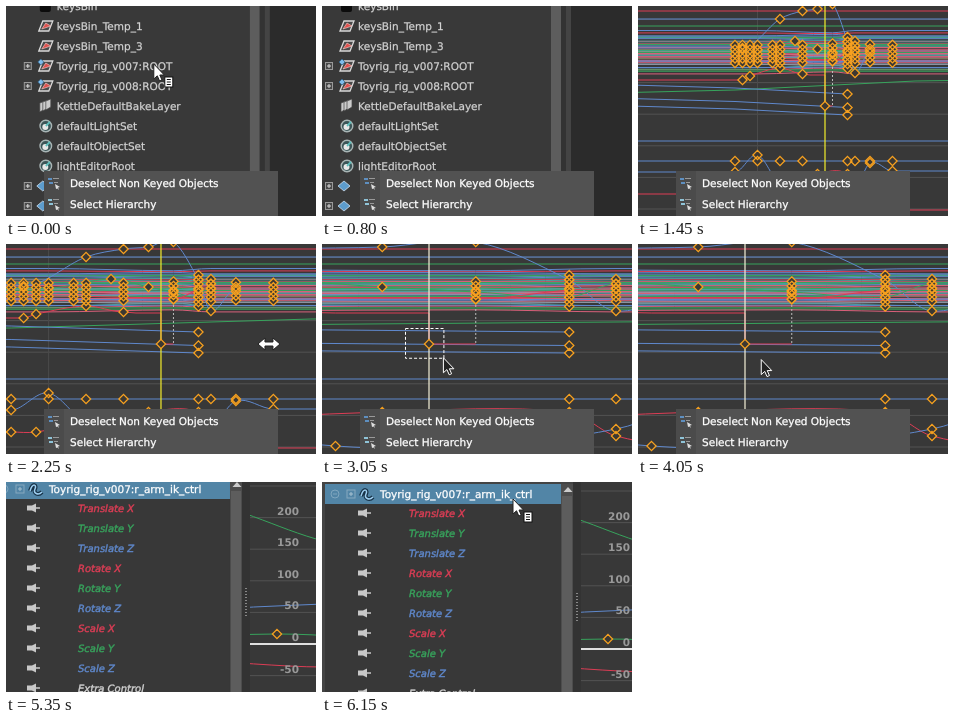
These frames come from a looping animation (310x210 px, 6.6 s). An HTML page:

```html
<!DOCTYPE html>
<html lang="en">
<head>
<meta charset="utf-8">
<title>Select hierarchy, deselect non keyed objects</title>
<style>
html, body { margin: 0; width: 100%; height: 100%; overflow: hidden; background: #2b2b2b; }
svg { display: block; width: 310px; height: 210px; }
text { font-family: "DejaVu Sans", "Noto Sans", sans-serif; font-size: 10.5px; fill: #d2d2d2; stroke: #d2d2d2; stroke-width: .25; text-rendering: geometricPrecision; }
.sel { fill: #fff; stroke: #fff; stroke-width: .3; }
.attr { font-size: 10px; font-style: italic; stroke-width: .4; }
.axis { font-weight: bold; fill: #999; stroke: none; text-anchor: end; }
.curve { fill: none; vector-effect: non-scaling-stroke; }
</style>
</head>
<body>
<svg id="stage" viewBox="0 0 310 210"></svg>
<script>
const LOOP = 6600, RED = '#dc3d55', GREEN = '#37a35c', BLUE = '#5f88cc', PICK = '#5285a6';
const stage = document.getElementById('stage');
const $ = id => document.getElementById(id);

const rect = (x, y, w, h, fill, more = '') => `<rect x="${x}" y="${y}" width="${w}" height="${h}" fill="${fill}" ${more}/>`;
const path = (d, more) => `<path d="${d}" ${more}/>`;
const label = (x, y, s, more = '') => `<text x="${x}" y="${y + 4}" ${more}>${s}</text>`;
const at = (x, y, s) => `<g transform="translate(${x} ${y})">${s}</g>`;
const fold = (x, y, open) => at(x, y, rect(-3.5, -3.5, 7, 7, '#4a4a4a', 'stroke="#999"') +
  path('M-2 0H2' + (open ? '' : 'M0 -2V2'), 'stroke="#ddd"'));

// ---- icons, centred on 0,0
const joint = path('M-7 5L-3 -5H7L3 5Z', 'fill="#4a4a4a" stroke="#d8d8d8" stroke-width="1.3"') +
  path('M-4 3L0 -3L5 0Z', 'fill="#e0524f" stroke="#f2d5d2" stroke-width=".6"');
const gem = path('M-5 -7L-2 -4L-5 -1L-8 -4Z', 'fill="#7fbcea" stroke="#2e5f88" stroke-width=".7"');
const mesh = path('M-6 0L0 -5L7 0L0 5Z M-3 -2.5L3.5 2.5M3.5 -2.5L-3 2.5', 'fill="#dfe3e6" stroke="#3d4a55" stroke-width=".9"');
const layers = [0, 3, 6].map(i => path(`M${i - 6} ${-3 - i / 3}l5 -2v8l-5 3Z`, 'fill="#ccc" stroke="#444" stroke-width=".7"')).join('');
const ring = '<circle r="5.8" fill="#3c5557" stroke="#a9b5b5" stroke-width="1.4"/>' +
  '<circle cx="-.5" cy="1" r="3" fill="#e8e8e8"/>' + path('M0 0L4 -4', 'stroke="#5fc0bd" stroke-width="1.8"');
const bead = path('M0 -5L6 0L0 5L-6 0Z', 'fill="#5d9ccc" stroke="#cde" stroke-width=".8"');
const mute = path('M-6 -2.5H-1L3 -4.5V4.5L-1 2.5H-6Z M3 -.8H7V.8H3Z', 'fill="#c8c8c8"');
const wave = (color, width) => path('M-6 2C-3 -7 1 -4 -1 0S2 7 6 3', `fill="none" stroke="${color}" stroke-width="${width}"`);
const bend = wave('#173247', 4) + wave('#9fd0f2', 1.5);

// ---- scene list
function sceneList() {
  const rows = (y, list, fn) => list.map((s, i) => fn(s, y + i * 20)).join('');
  const top = rect(34, -5, 11, 11, '#0c0c0c', 'rx="2"') + label(51, 0, 'keysBin') +
    rows(20, ['keysBin_Temp_1', 'keysBin_Temp_3'], (s, y) => at(40, y, joint) + label(51, y, s));
  const rest = fold(22, 80) + at(40, 80, joint + gem) + label(51, 80, 'Toyrig_rig_v008:ROOT') +
    at(40, 100, layers) + label(51, 100, 'KettleDefaultBakeLayer') +
    rows(120, ['defaultLightSet', 'defaultObjectSet', 'lightEditorRoot'], (s, y) => at(40, y, ring) + label(51, y, s)) +
    rows(180, ['', ''], (s, y) => fold(22, y) + at(37, y, bead));
  const kids = rect(0, 70, 244, 145, PICK) + path('M22 70V210M34 88V210M46 88V210', 'stroke="#3f6985" stroke-dasharray="1 1"') +
    fold(34, 80, true) + at(51, 80, joint + gem) + label(64, 80, 'Toyrig_rig_v007:MESH', 'class="sel"') +
    rows(100, ['upperteeth', 'brows', 'lowerteeth', 'tongue', 'eyes', 'lashes'], (s, y) =>
      `<circle cx="46" cy="${y}" r="2.2" fill="#9db6c6"/>` + at(63, y, mesh + gem) +
      label(75, y, `Toyrig_rig_v007:${s}_c_geo`, 'class="sel"'));
  return `<g id="list">${rect(-30, 0, 900, 210, '#2b2b2b')}${rect(-30, 0, 274, 210, '#393939')}
    ${rect(244, 0, 10, 210, '#5d5d5d')}${rect(254, 0, 10, 210, '#333')}${rect(259, 0, 5, 210, '#444')}
    <g clip-path="url(#listClip)">${top}<g id="rest">${rest}</g><g clip-path="url(#openClip)">${kids}</g>
    ${rect(0, 50, 244, 20, PICK, 'id="rootSel"')}<g id="plus">${fold(22, 60)}</g><g id="minus">${fold(22, 60, true)}</g>
    ${at(40, 60, joint + gem)}${label(51, 60, 'Toyrig_rig_v007:ROOT', 'id="root"')}</g></g>`;
}

// ---- curves: points are [key time, y], level beyond both ends
function smooth(p) {
  const last = p.length - 1;
  const slope = i => i === 0 || i === last ? 0 : (p[i + 1][1] - p[i - 1][1]) / (p[i + 1][0] - p[i - 1][0]);
  let d = `M-40 ${p[0][1]}H${p[0][0]}`;
  for (let i = 1; i <= last; i++) {
    const [a, b] = [p[i - 1], p[i]], h = (b[0] - a[0]) / 3;
    d += `C${a[0] + h} ${a[1] + h * slope(i - 1)} ${b[0] - h} ${b[1] - h * slope(i)} ${b}`;
  }
  return d;
}
const curve = (d, color) => path(d, `class="curve" stroke="${color}"`);

const tracks = [
  { color: BLUE, keys: [[-11, 42], [-6, 13], [-3, 5], [-1, 3], [1, -2], [3, 36], [4, 67], [6, 45]], tail: 'H40' },
  { color: GREEN, keys: [[-9, 44], [-4, 35], [-1, 43], [1, 48], [3, 53], [4, 40]], tail: 'H40' },
  { color: GREEN, keys: [[-6, -98], [-3, -58], [-1, -40]], tail: 'H40' },
  { color: RED, keys: [[-11, 74], [-10, 70], [-6, 62], [-3, 68]], tail: 'L-2 69H0V100H1' },
  { color: RED, keys: [[1, 55], [3, 46], [4, 45]], tail: 'H40', from: 1 },
  { color: RED, keys: [[-12, 188], [-10, 188], [-1, 168], [3, 168], [4, 192], [6, 204]], tail: 'H40' },
  { color: BLUE, keys: [[-12, 166], [-9, 149], [-6, 180], [-2, 202], [1, 203], [4, 185], [6, 157], [9, 165]], tail: 'H40' }
];
const trackPath = k => (k.from ? smooth(k.keys).replace(/^M-40 .*?H/, `M${k.keys[0]}H`) : smooth(k.keys)) + k.tail;
const keyed = tracks.map(k => curve(trackPath(k), k.color)).join('');
const mainKeys = tracks.flatMap(k => k.keys);

let seed = 11;
const rnd = () => (seed = seed * 16807 % 2147483647) / 2147483647;
const sinking = [88, 101.5, 109];

function flatLines() {
  const tint = [RED, GREEN, BLUE, '#d9607a', '#4d9fa0', '#8f9aa8'];
  let s = '';
  for (let i = 0; i < 50; i++) {
    // crowded around zero, thinner further out
    const r = i / 25 - 1, y = 47 + 21 * r * (.6 + .4 * r * r), k = rnd() * 3 - 1.5;
    s += curve(smooth([[-9, y + k], [1, y - k / 2], [4, y + k]]) + 'H40', tint[Math.floor(rnd() * 6)]);
  }
  [5, 13, 20, 135, 155].forEach((y, i) => s += curve(`M-40 ${y}H40`, [RED, BLUE, GREEN, BLUE, BLUE][i]));
  s += curve('M-40 89L-12 84L12 75L40 72', GREEN);
  sinking.forEach(y => s += curve(`M-40 ${y - 12}L-12 ${y - 6}L3 ${y}`, BLUE));
  return s;
}

const moreKeys = sinking.map(y => [3, y]);
for (const u of [-12, -11, -10, -9, -7, -6, -3, 1, 3, 4, 6, 9]) {
  const half = 9 + 8 / (1 + (u - 3) ** 2);
  for (let y = 48 - half; y <= 48 + half; y += 4.5) moreKeys.push([u, y]);
  if (u % 3 === 0 || u === 4) moreKeys.push([u, 155]);
}
const diamond = (x, y) => `M${x} ${y - 4.6}l4.6 4.6l-4.6 4.6l-4.6 -4.6Z`;

// ---- curve editor, with its channel panel to the left
function editor() {
  const axes = [['X', RED], ['Y', GREEN], ['Z', BLUE]];
  let grid = '', axis = '', rows = '';
  for (let v = -300; v <= 300; v += 50) {
    const y = 45 - v * .632;
    grid += path(`M-107 ${y}H700`, 'stroke="#525252"');
    if (v > -100 && v < 250) axis += label(-58, y - 7, v, 'class="axis"');
  }
  ['Translate', 'Rotate', 'Scale'].forEach((n, i) => axes.forEach(([a, c], j) => {
    const y = 31 + (i * 3 + j) * 20;
    rows += at(42, y, mute) + label(87, y, `${n} ${a}`, `class="attr" style="fill:${c};stroke:${c}"`);
  }));
  rows += at(42, 211, mute) + label(87, 211, 'Extra Control', 'class="attr"');
  const panel = rect(-300, -300, 559, 800, '#444') + rect(3, 2, 236, 400, '#383838') + rect(3, 2, 236, 20, PICK) +
    '<circle cx="13" cy="12" r="4" fill="none" stroke="#7fa6bf"/>' + path('M11 12H15', 'stroke="#7fa6bf"') +
    at(29, 12, rect(-4, -4, 8, 8, 'none', 'stroke="#86a9bf"') + path('M-2 0H2M0 -2V2', 'stroke="#a8c2d2"')) +
    at(45, 12, bend) + label(58, 12, 'Toyrig_rig_v007:r_arm_ik_ctrl', 'class="sel"') + rows +
    rect(239, 2, 12, 400, '#4d4d4d') + rect(240, 14, 10, 390, '#5d5d5d') + path('M241.5 10L246 5L250.5 10Z', 'fill="#ccc"') +
    rect(251, -300, 8, 800, '#333') + path('M255 111V140', 'stroke="#888" stroke-width="2" stroke-dasharray="1 2"');
  return `<g id="ed">${rect(-107, -300, 900, 800, '#383838')}${grid}
    <path id="tick" stroke="#4a4a4a"/>${path('M-107 45H700', 'stroke="#e0e0e0" stroke-width="2"')}
    <g id="zoom"><g id="flat">${flatLines()}</g>${keyed}</g>
    <path id="step" stroke="#bbb" stroke-dasharray="2 2"/><path id="bar" stroke-width="1.2"/>
    <g fill="#3c3832" stroke="#f6a01f" stroke-width="1.3"><path id="keys"/><path id="hot"/></g>
    ${axis}<g id="panel" transform="translate(-366 -122)">${panel}</g></g>`;
}

function menu() {
  const icon = (y, c) => at(48, y, rect(-6, -5, 4, 2, c) + rect(-5, -1, 4, 2, c) + rect(-1, -5, 6, 1, '#999') + rect(0, -1, 4, 1, '#999') +
    path('M1 1L6 4L4 4.500L5 7L3.500 5.500L2 6Z', 'fill="#ddd"'));
  return `<g id="menu">${rect(38, 165, 234, 45, '#525252')}${rect(38, 165, 20, 45, '#4b4b4b')}
    ${rect(58, 166, 214, 22, PICK, 'id="pick1"')}${rect(58, 188, 214, 20, PICK, 'id="pick2"')}${icon(177, '#5e8fc0')}${icon(198, '#8fc4d8')}
    ${label(64, 177, 'Deselect Non Keyed Objects', 'class="sel"')}${label(64, 198, 'Select Hierarchy', 'class="sel"')}</g>`;
}

stage.innerHTML = `<defs><clipPath id="listClip">${rect(0, 0, 244, 210, '#000')}</clipPath>
  <clipPath id="openClip"><rect id="open" y="70" width="244" height="0"/></clipPath></defs>
  ${sceneList()}${editor()}
  <rect id="marquee" x="83.5" y="84.5" fill="none" stroke="#fff" stroke-dasharray="3 2"/>
  <g id="arrow">${path('M0 0V15L3.5 11.8L5.8 17L8.2 16L6 11H10.5Z', 'id="tip"')}
    <g id="sheet">${rect(11, 13, 8, 10, '#fff', 'stroke="#111"')}${path('M13 15.5H17M13 18H17M13 20.5H17', 'stroke="#111"')}</g></g>
  <g id="drag">${path('M-11 0L-4 -6V-2H4V-6L11 0L4 6V2H-4V6Z', 'fill="#fff" stroke="#222"')}</g>
  ${menu()}`;

// ---- motion
const part = (t, a, b) => Math.min(1, Math.max(0, (t - a) / (b - a)));
const ease = p => p < .5 ? Math.pow(2 * p, 2.7) / 2 : 1 - Math.pow(2 - 2 * p, 2.7) / 2;
const glide = (t, a, b) => ease(part(t, a, b));
const slide = t => 1 - Math.pow(1 - part(t, 0, 150), 2);
const mix = (a, b, p) => a + (b - a) * p;
const show = (id, on) => $(id).setAttribute('display', on ? 'inline' : 'none');
const move = (id, x, y) => $(id).setAttribute('transform', `translate(${x} ${y})`);
const set = (id, k, v) => $(id).setAttribute(k, v);
const within = (t, a, b) => t >= a && t < b;

function pointer(t) {
  const go = (a, b, p) => [mix(a[0], b[0], p), mix(a[1], b[1], p)];
  const corner = [83, 84], rest = [123, 115];
  if (t < 300) return [148 - 15 * slide(t), 58];
  if (t < 1500) return go([133, 58], [123, 172], part(t, 300, 400));
  if (t < 2850) return go([263, 100], corner, glide(t, 2450, 2850));
  if (t < 4000) return go(corner, rest, glide(t, 2850, 3100));
  if (t < 5400) return go(rest, [150, 178], glide(t, 4000, 4450));
  return go([258, 128], [191, 17], glide(t, 5800, 6150));
}

function draw(t) {
  const enter = glide(t, 1250, 1450), back = glide(t, 4950, 5450), open = glide(t, 850, 1050);

  show('list', t < 1450);
  move('list', -15 * slide(t) - 400 * enter, 0);
  move('rest', 0, 150 * open);
  set('open', 'height', 145 * open);
  show('rootSel', t >= 850);
  show('plus', open === 0);
  show('minus', open > 0);
  set('root', 'class', t >= 850 ? 'sel' : '');

  // horizontal zoom about the current time
  const scrub = glide(t, 1700, 2400), near = glide(t, 2450, 3000);
  const z = 12.5 * (.6 + .42 * scrub), unit = z * Math.pow(46.75 / z, near);
  const x0 = mix(187 - 33.7 * scrub, 107, near), x = u => x0 + u * unit;
  const all = t < 4700;
  show('ed', t > 1250);
  move('ed', 400 * (1 - enter) + 366 * back, 122 * back);
  set('zoom', 'transform', `translate(${x0} 0) scale(${unit} 1)`);
  show('flat', all);
  show('panel', t >= 4950);
  set('tick', 'd', `M${x(-9)} -300V400`);
  set('step', 'd', `M${x(1)} 57V100`);
  set('bar', 'd', `M${x0} -300V400`);
  set('bar', 'stroke', t < 2500 ? '#f4ee2c' : '#f5f1d8');
  set('keys', 'd', (all ? moreKeys.concat(mainKeys) : mainKeys).map(([u, y]) => diamond(x(u), y)).join(''));
  set('hot', 'd', diamond(x0, 100));
  set('hot', 'stroke', within(t, 3250, 3800) ? '#fff24a' : '#f6a01f');

  const [px, py] = pointer(t), press = within(t, 3500, 3750) ? 1 : 0;
  const context = t < 400 || t >= 5400;
  show('marquee', within(t, 2850, 3250));
  set('marquee', 'width', Math.max(0, px - 83));
  set('marquee', 'height', Math.max(0, py - 84));
  show('arrow', context || within(t, 2500, 4450));
  show('sheet', context);
  set('tip', 'fill', context ? '#fff' : '#222');
  set('tip', 'stroke', context ? '#222' : '#fff');
  move('arrow', px, py + press);
  show('drag', within(t, 1750, 2500));
  move('drag', mix(205, 266, scrub), 100);

  show('menu', t < 5000);
  show('pick1', within(t, 4350, 4600) || within(t, 4650, 4750));
  show('pick2', within(t, 700, 800) || within(t, 850, 1350));
}

const start = performance.now();
function frame() {
  draw((performance.now() - start) % LOOP);
  requestAnimationFrame(frame);
}
draw(0);
requestAnimationFrame(frame);
</script>
</body>
</html>
```
